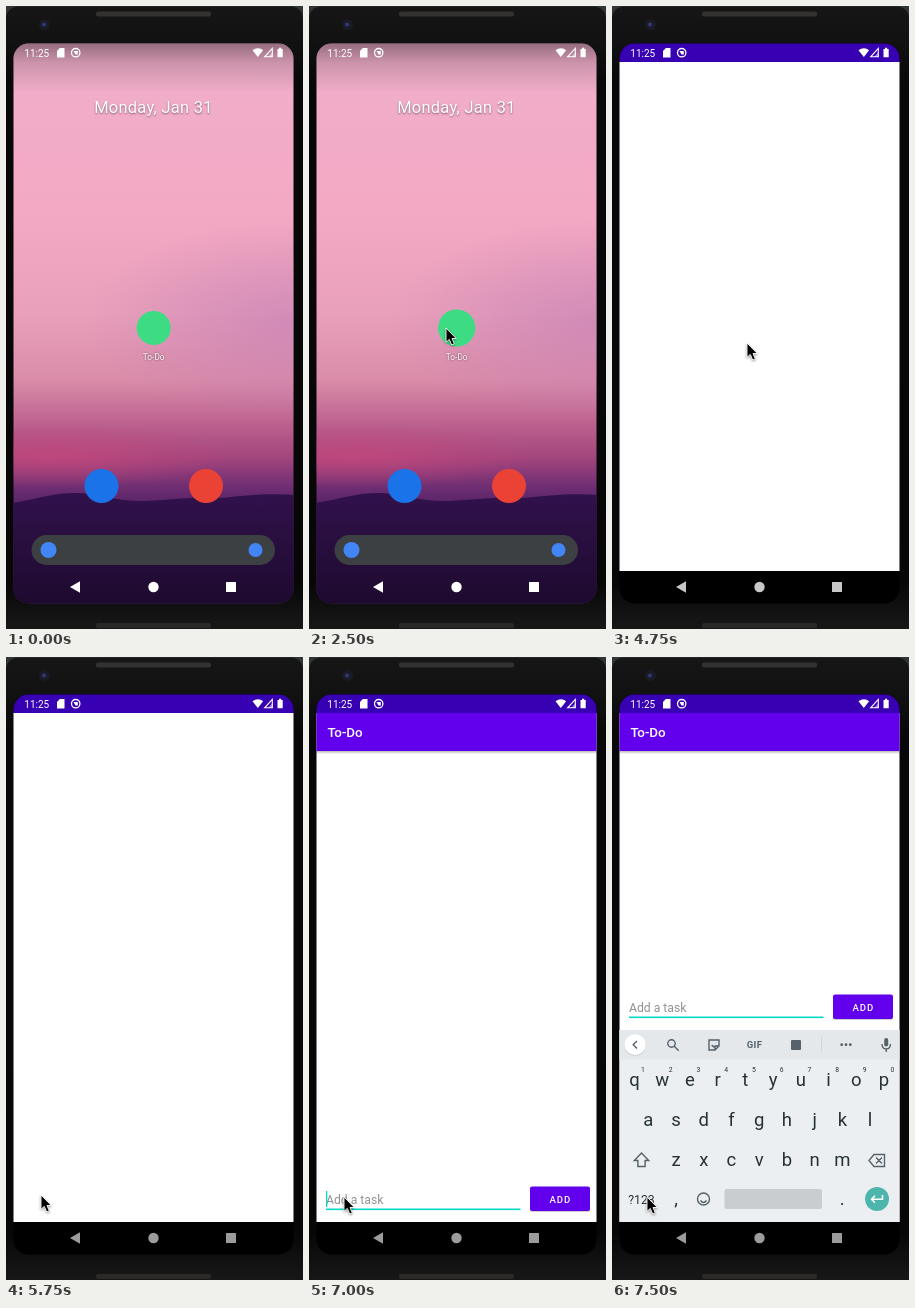
These frames come from a looping animation (297x623 px, 8 s). An HTML page:

```html
<!DOCTYPE html>
<html lang="en">
<head>
<meta charset="utf-8">
<title>To-Do</title>
<style>
  html, body { margin: 0; width: 100%; height: 100%; overflow: hidden; background: #0b0b0b; }
  svg { display: block; font-family: Roboto, sans-serif; }
  .mid { text-anchor: middle; }
  .line { fill: none; stroke: #566169; stroke-width: 1.4; }
  #pointer { filter: drop-shadow(0 1px 1px #0006); }
</style>
</head>
<body>
<svg width="297" height="623" viewBox="0 0 297 623">
  <defs>
    <clipPath id="screen"><rect x="7.5" y="37.5" width="280" height="560" rx="15"/></clipPath>
    <clipPath id="content"><rect x="7" y="94" width="282" height="471"/></clipPath>
    <linearGradient id="body" x2="0" y2="1">
      <stop stop-color="#161616"/><stop offset=".06" stop-color="#111"/>
      <stop offset=".12" stop-color="#080808"/><stop offset=".9" stop-color="#070707"/>
      <stop offset=".96" stop-color="#151515"/><stop offset="1" stop-color="#191919"/>
    </linearGradient>
    <linearGradient id="sky" x2="0" y2="1">
      <stop stop-color="#f0aecb"/><stop offset=".3" stop-color="#f3a9c4"/>
      <stop offset=".48" stop-color="#e9a0bb"/><stop offset=".6" stop-color="#da8ca9"/>
      <stop offset=".68" stop-color="#bb608d"/><stop offset=".74" stop-color="#a0447c"/>
      <stop offset=".79" stop-color="#6f2e72"/><stop offset=".83" stop-color="#4f2162"/>
    </linearGradient>
    <radialGradient id="haze">
      <stop stop-color="#b977b4" stop-opacity=".5"/><stop offset="1" stop-color="#b977b4" stop-opacity="0"/>
    </radialGradient>
    <radialGradient id="glow">
      <stop stop-color="#c8487c" stop-opacity=".75"/><stop offset="1" stop-color="#c8487c" stop-opacity="0"/>
    </radialGradient>
    <linearGradient id="scrim" x2="0" y2="1">
      <stop stop-opacity=".38"/><stop offset=".4" stop-opacity=".15"/><stop offset="1" stop-opacity="0"/>
    </linearGradient>
    <linearGradient id="hill" x2="0" y2="1">
      <stop stop-color="#31114b"/><stop offset="1" stop-color="#1d0a2e"/>
    </linearGradient>
    <linearGradient id="shade" x2="0" y2="1">
      <stop stop-opacity=".28"/><stop offset="1" stop-opacity="0"/>
    </linearGradient>
  </defs>

  <!-- phone body -->
  <rect width="297" height="623" fill="#303536"/>
  <rect y=".5" width="297" height="640" rx="12" fill="url(#body)"/>
  <rect x="90" y="5.5" width="115" height="5" rx="2" fill="#343231"/>
  <rect x="90" y="617" width="115" height="5" rx="2" fill="#2b2928"/>
  <circle cx="38.5" cy="18.5" r="5.5" fill="#1b1b25"/>
  <circle cx="38" cy="18.5" r="2" fill="#30377c"/>

  <g clip-path="url(#screen)">
    <g id="home">
      <rect x="7" y="37" width="282" height="562" fill="url(#sky)"/>
      <ellipse cx="290" cy="315" rx="210" ry="100" fill="url(#haze)"/>
      <ellipse cx="45" cy="450" rx="190" ry="32" fill="url(#glow)"/>
      <rect x="7" y="37" width="282" height="50" fill="url(#scrim)"/>
      <path d="M7 497C30 493 50 486 72 487S112 496 140 495S180 491 202 492S245 486 289 489V599H7Z" fill="url(#hill)"/>
      <text class="mid" x="147.5" y="106.5" font-size="16.4" letter-spacing=".3" fill="#fff" style="text-shadow:0 1px 2px #0007">Monday, Jan 31</text>
      <circle id="icon" cx="147.7" cy="322" r="17" fill="#3ddc84"/>
      <text class="mid" x="147.7" y="354" font-size="8.3" fill="#fff" style="text-shadow:0 0 2px #0009">To-Do</text>
      <circle cx="95.5" cy="480" r="17" fill="#1a73e8"/>
      <circle cx="200" cy="480" r="17" fill="#ea4335"/>
      <rect x="25.5" y="529" width="243.5" height="30" rx="15" fill="#3c4043"/>
      <circle cx="42.5" cy="544" r="8" fill="#4285f4"/>
      <circle cx="249.5" cy="544" r="7" fill="#4285f4"/>
    </g>

    <g id="app">
      <rect x="7" y="37" width="282" height="562"/>
      <rect x="7" y="56" width="282" height="509" fill="#fff"/>
      <rect x="7" y="37" width="282" height="19" fill="#3700b3"/>
      <g id="view">
        <rect x="7" y="94" width="282" height="3" fill="url(#shade)"/>
        <rect x="7" y="56" width="282" height="38" fill="#6200ee"/>
        <text x="18.5" y="80" font-size="13.4" font-weight="500" fill="#fff">To-Do</text>
        <g id="entry">
          <text id="hint" x="17" y="547" font-size="12.2">Add a task</text>
          <rect id="rule" x="17" width="194.5"/>
          <rect id="caret" x="17" y="534" width="1.3" height="16" fill="#03dac5"/>
          <rect x="221" y="531" width="60" height="24" rx="2" fill="#0003"/>
          <rect x="221" y="529.5" width="60" height="24.5" rx="2" fill="#6200ee"/>
          <text class="mid" x="251.3" y="545.5" font-size="9.6" font-weight="500" letter-spacing=".9" fill="#fff">ADD</text>
        </g>
      </g>
      <g clip-path="url(#content)">
        <g id="keyboard">
          <rect x="7" y="373" width="282" height="192" fill="#eceff1"/>
          <rect x="7" y="373" width="282" height="29.5" fill="#e4e8eb"/>
          <circle cx="23" cy="388.5" r="10.5" fill="#0002"/>
          <circle cx="23" cy="387.7" r="10.5" fill="#fff"/>
          <g class="line">
            <path d="M25 384l-3.8 3.8 3.8 3.8"/>
            <circle cx="59.5" cy="386.5" r="3.7"/><path d="M62.3 389.3l4.4 4.4"/>
            <path d="M97 383h10v6l-4 4h-6ZM103 393v-4h4M99.7 388q2 3 3.5 1M100 385.5h.1M104 385.5h.1"/>
            <path d="M209.5 380v15" stroke="#cfd5d8" stroke-width="1"/>
            <path d="M270 387q0 5 4.2 5t4.2-5M274.2 392v3"/>
            <path d="M29.5 496l7.2 7.5h-3.6v6h-7.2v-6h-3.6Z"/>
            <path d="M262 497.5h10.5v12H262l-5-6ZM264 500.5l6 6M270 500.5l-6 6"/>
            <circle cx="91.5" cy="542" r="6"/><path d="M88.5 543.5q3 4 6 0M89.3 540h.1M93.5 540h.1"/>
          </g>
          <rect x="179" y="383" width="10" height="10" rx="1" fill="#566169"/>
          <g fill="#566169">
            <circle cx="229.7" cy="387.7" r="1.4"/><circle cx="234" cy="387.7" r="1.4"/><circle cx="238.3" cy="387.7" r="1.4"/>
            <rect x="272.2" y="381" width="4" height="8.5" rx="2"/>
            <text class="mid" x="142.5" y="391.3" font-size="9.5" font-weight="700" letter-spacing=".4">GIF</text>
          </g>
          <g id="keys" class="mid" fill="#263238"></g>
          <rect x="112.5" y="532" width="97.5" height="20" rx="2" fill="#c9cdd0"/>
          <circle cx="265" cy="542" r="12" fill="#4db6ac"/>
          <path d="M270.5 538v4.3h-10.5M263 538.8l-3.5 3.5 3.5 3.5" fill="none" stroke="#fff" stroke-width="1.5"/>
        </g>
      </g>
    </g>

    <!-- status bar -->
    <g fill="#fff">
      <text x="18.3" y="50.5" font-size="10">11:25</text>
      <path d="M53.8 42H58.5V51.5H51V45Z"/>
      <circle cx="69.7" cy="46.7" r="4.2" fill="none" stroke="#fff" stroke-width="1.3"/>
      <path d="M67.5 45h4.3v3.5h-2.3Z"/>
      <path d="M246.5 44.3q5.3-4.3 10.6 0L251.8 51Z"/>
      <path d="M266.3 42.5v8.3h-7.6Z" fill="none" stroke="#fff" stroke-width="1.1"/>
      <path d="M266.5 46v5h-4.5Z" fill-opacity=".5"/>
      <path d="M271.5 43h1.5v-1.2h2.2V43h1.5v8.3h-5.2Z"/>
    </g>
    <!-- navigation -->
    <g id="nav">
      <path d="M64 581l10-5.7v11.4Z"/>
      <circle cx="147.5" cy="581" r="5.2"/>
      <rect x="220" y="576" width="10" height="10" rx=".6"/>
    </g>
  </g>
  <path id="pointer" d="M0 0V14.3L3.3 11.4 5.7 17 8.3 15.9 6 10.5H10.3Z" stroke="#fff" stroke-width=".9"/>
</svg>
<script>
const $ = id => document.getElementById(id);
const set = (id, attrs) => { for (const k in attrs) $(id).setAttribute(k, attrs[k]); };
const show = (id, on) => set(id, { display: on ? 'inline' : 'none' });
const LOOP = 8000, STEP = 250, PITCH = 27.72;

const label = (s, x, y, size = 18.5) => `<text x="${x}" y="${y}" font-size="${size}">${s}</text>`;
const row = (chars, x, y, size) => [...chars].map((c, i) => label(c, x + i * PITCH, y, size)).join('');
$('keys').innerHTML =
  row('qwertyuiop', 22.5, 428.5) + row('asdfghjkl', 36.3, 468.5) + row('zxcvbnm', 64, 508.5) +
  row('1234567890', 31, 415, 6.8) +
  label('?123', 29.5, 546.5, 12.3) + label(',', 64, 547.5) + label('.', 230.3, 547.5);

// [start, value...]: each value holds until the next start
const pointerPath = [
  [500, 108, 183], [750, 122, 245], [1000, 125, 280], [1250, 131, 322], [1500, 135, 322],
  [1750, 137, 322], [4750, 135, 337], [5000, 90, 386], [5250, 35, 532], [5500, 35, 535],
  [5750, 35, 538], [6750, 35, 540]
];
const iconSize = [[0, 17], [1750, 17.3], [2000, 17.6], [2250, 18], [2500, 18.6]];
const at = (keys, t) => keys.filter(k => k[0] <= t).pop();

function draw(now) {
  const t = Math.floor(now % LOOP / STEP) * STEP;
  const focused = t >= 6750, typing = t >= 7250, sliding = t === 7250;
  const spot = at(pointerPath, t);

  show('pointer', spot);
  if (spot) set('pointer', { transform: `translate(${spot[1]} ${spot[2]})` });
  set('icon', { r: at(iconSize, t)[1] });
  show('home', t < 3750);
  show('app', t >= 3750);
  show('view', t >= 6250);
  set('nav', { fill: t < 4750 ? '#fff' : t < 5000 ? '#c8c8c8' : '#9c9c9c' });

  set('entry', { transform: `translate(0 ${typing ? -192 : 0})` });
  set('hint', { fill: t === 6750 ? '#7d7d7d' : '#929292' });
  set('rule', focused ? { y: 551.5, height: 1.6, fill: '#03dac5' } : { y: 551.5, height: 0.8, fill: '#8a8a8a' });
  show('caret', focused && t < 7500);
  show('keyboard', typing);
  set('keyboard', { transform: `translate(0 ${sliding ? 20 : 0})`, opacity: sliding ? 0.7 : 1 });
  requestAnimationFrame(() => draw(performance.now() - start));
}
const start = performance.now();
draw(0);
</script>
</body>
</html>
```
